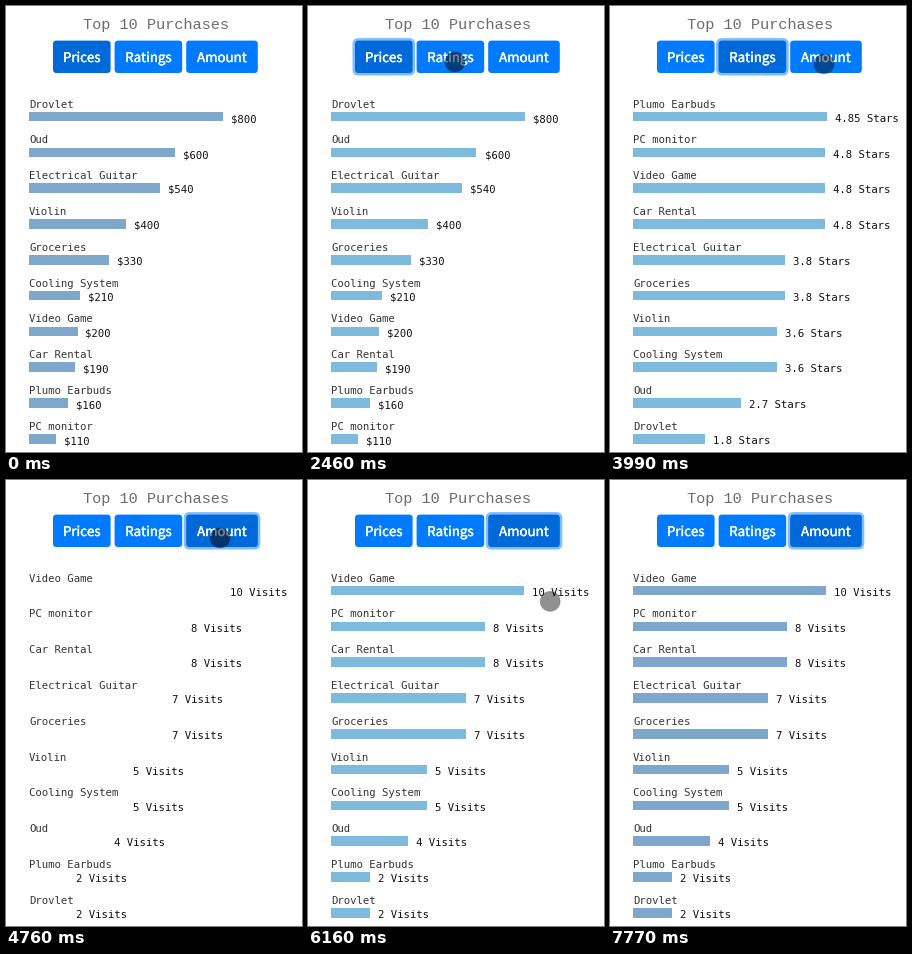
A matplotlib script that plays this animation: 296 by 446 pixels, repeating every 8.64 s.

```python
import math

import matplotlib.pyplot as plt
import numpy as np
from matplotlib.animation import FuncAnimation
from matplotlib.patches import Circle, FancyBboxPatch, Rectangle
from matplotlib.patheffects import Normal, Stroke

W, H, DPI = 296, 446, 64
LOOP, STEP = 8640, 20
TICK, FIRST_TICK = 77.1, 370      # the screen refreshes in coarse ticks
PITCH, LEFT = 35.8, 23
MONO, SANS = "DejaVu Sans Mono", "Noto Sans CJK JP"

# name: price, rating, amount
ITEMS = {
    "Plumo Earbuds": (160, 4.85, 2),
    "PC monitor": (110, 4.8, 8),
    "Video Game": (200, 4.8, 10),
    "Car Rental": (190, 4.8, 8),
    "Electrical Guitar": (540, 3.8, 7),
    "Groceries": (330, 3.8, 7),
    "Violin": (400, 3.6, 5),
    "Cooling System": (210, 3.6, 5),
    "Oud": (600, 2.7, 4),
    "Drovlet": (800, 1.8, 2),
}
FORMATS = (r"\${}", "{} Stars", "{} Visits")
SCALES = (194 / 800, 40, 19.25)   # pixels per unit

BUTTONS = {"Prices": 57.6, "Ratings": 67.6, "Amount": 71.6}   # widths
BUTTON_LEFT, BUTTON_GAP = 47, 4

CLICKS = (1465, 2562, 4738)       # one per button, left to right
GROW, SETTLE = 1000, 1588

# start, end, x, y of each cursor move
CURSOR_HOME, CURSOR_GONE = (148, 279), 7765
MOVES = [(370, 680, 98, 62), (910, 1060, 82, 59), (2225, 2450, 147, 56),
         (3230, 3454, 190, 58), (3840, 3990, 214, 58), (6075, 6306, 270, 184),
         (6385, 6538, 230, 146), (6615, 6845, 224, 326),
         (7000, 7690, 30, 434)]

PALE = np.array((190, 236, 243)) / 255
SKY = np.array((126, 186, 219)) / 255
STEEL = np.array((126, 167, 203)) / 255
BLUE, DARK_BLUE, RING = "#007bff", "#0069d9", "#80bdff"


def px(size):
    return size * 72 / DPI


def clamp(p):
    return min(max(p, 0), 1)


def cubic_in_out(p):
    return 4 * p ** 3 if p < 0.5 else 1 - 4 * (1 - p) ** 3


def sine_out(p):
    return math.sin(p * math.pi / 2)


def round_box(x, y, w, h, pad, radius, color):
    box = FancyBboxPatch((x - pad, y - pad), w + 2 * pad, h + 2 * pad,
                         boxstyle=f"round,pad=0,rounding_size={radius + pad}",
                         fc=color, lw=0)
    return ax.add_patch(box)


def mono(x, y, color):
    return ax.text(x, y, "", family=MONO, size=px(10.6), color=color,
                   va="baseline")


fig = plt.figure(figsize=(W / DPI, H / DPI), dpi=DPI, facecolor="white")
ax = fig.add_axes((0, 0, 1, 1))
ax.set_xlim(0, W)
ax.set_ylim(H, 0)
ax.axis("off")

ax.text(150, 23, "Top 10 Purchases", family="Liberation Mono", size=px(15.2),
        color="#6c6c6c", ha="center", va="baseline")

rings, buttons = [], []
x = BUTTON_LEFT
for name, width in BUTTONS.items():
    rings.append(round_box(x, 34.6, width, 32.4, 2.5, 3.5, RING))
    buttons.append(round_box(x, 34.6, width, 32.4, 0, 3.5, BLUE))
    bolder = [Stroke(linewidth=px(0.35), foreground="white"), Normal()]
    ax.text(x + width / 2, 56, name, family=SANS, size=px(13.3),
            color="white", ha="center", va="baseline", path_effects=bolder)
    x += width + BUTTON_GAP

bars, labels, values = [], [], []
for i in range(len(ITEMS)):
    y = i * PITCH
    bars.append(ax.add_patch(Rectangle((LEFT, 105.7 + y), 0, 9.7, lw=0)))
    labels.append(mono(LEFT, int(102 + y), "#363636"))
    values.append(mono(0, int(116.3 + y), "#111111"))

cursor = ax.add_patch(Circle((0, 0), 10, lw=px(1), ec=(0, 0, 0, 0.15),
                             zorder=5))


def draw_buttons(clicks):
    for i, (ring, button) in enumerate(zip(rings, buttons)):
        ring.set_visible(i == clicks - 1)
        active = i == max(clicks - 1, 0)
        button.set_facecolor(DARK_BLUE if active else BLUE)


def draw_chart(t, clicks):
    view = max(clicks - 1, 0)
    age = t - CLICKS[view] if clicks else LOOP
    grown = cubic_in_out(clamp(age / GROW))
    color = STEEL if age >= SETTLE else PALE + (SKY - PALE) * grown
    ranked = sorted(ITEMS, key=lambda item: -ITEMS[item][view])
    for name, bar, label, text in zip(ranked, bars, labels, values):
        value = ITEMS[name][view]
        width = value * SCALES[view]
        bar.set_width(width * grown)
        bar.set_facecolor(color)
        label.set_text(name)
        text.set_text(FORMATS[view].format(value))
        text.set_x(LEFT + width + 8)


def draw_cursor(t):
    cursor.set_visible(FIRST_TICK <= t < CURSOR_GONE)
    x, y = CURSOR_HOME
    for start, end, to_x, to_y in MOVES:
        p = sine_out(clamp((t - start) / (end - start)))
        x += (to_x - x) * p
        y += (to_y - y) * p
    cursor.center = x, y
    pressed = any(-130 <= t - click < 600 for click in CLICKS)
    cursor.set_facecolor((0, 0, 0, 0.5 if pressed else 0.43))


def update(frame):
    now = frame * STEP + STEP / 2
    t = FIRST_TICK + TICK * math.floor((now - FIRST_TICK + 5) / TICK)
    clicks = sum(t >= click for click in CLICKS)
    draw_buttons(clicks)
    draw_chart(t, clicks)
    draw_cursor(t)
    return []


anim = FuncAnimation(fig, update, frames=LOOP // STEP, interval=STEP,
                     init_func=lambda: [], repeat=True, repeat_delay=0,
                     blit=False)
plt.show()
```
